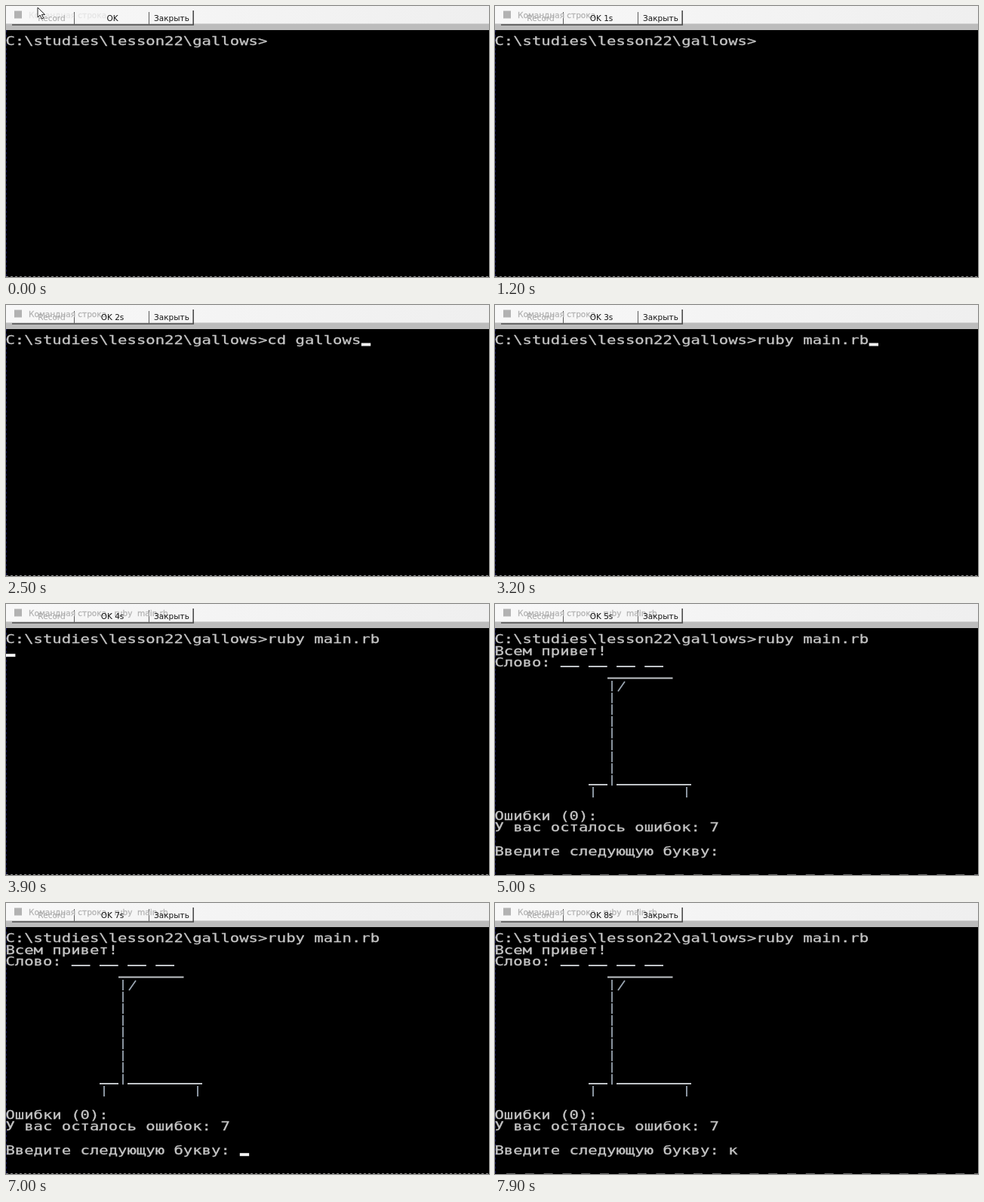
An HTML page that plays this animation: 640x360 px, repeating every 8 s.

```html
<!DOCTYPE html>
<html lang="ru">
<head>
<meta charset="utf-8">
<title>Console game</title>
<style>
  html, body { margin: 0; width: 100%; height: 100%; overflow: hidden; background: #000; }
  svg { display: block; width: 640px; height: 360px; }
  text { white-space: pre; }
  .ui { font: 10.5px "DejaVu Sans", sans-serif; fill: #151515; }
  .mid { text-anchor: middle; }
  #caption { fill: #b4b4b4; stroke: #b4b4b4; stroke-width: .3; }
  #console { font: 15.5px "DejaVu Sans Mono", monospace; fill: #c4c4c4; stroke: #c4c4c4; stroke-width: .3; }
  .art { fill: none; stroke: #c0c4c8; stroke-width: 2; }
  .thin { stroke: #98a4b0; stroke-width: 1.8; }
</style>
</head>
<body>
<svg viewBox="0 0 640 360">
  <defs>
    <linearGradient id="bar">
      <stop offset="0" stop-color="#f8f8f8"/>
      <stop offset="1" stop-color="#efefef"/>
    </linearGradient>
  </defs>

  <rect width="640" height="360"/>
  <path d="M.5 32V360" stroke="#10104c" stroke-dasharray="3 3"/>
  <path id="edge" d="M15 359.5H640"/>

  <rect width="640" height="24" fill="url(#bar)"/>
  <rect y="23.5" width="640" height="8.5" fill="#bcbcbc"/>
  <rect x="11" y="6.5" width="10" height="10" fill="#b2b2b2"/>
  <path d="M90.5 8V24M189.5 8V24" stroke="#5c5c5c"/>
  <path d="M8 25H248.2V6" fill="none" stroke="#4c4c4c" stroke-width="1.6"/>
  <text id="caption" class="ui" x="30" y="15.5"></text>
  <text class="ui mid" x="60.5" y="19.5" style="fill:#a6a6a6">Record</text>
  <text id="counter" class="ui mid" x="141" y="19.5"></text>
  <text class="ui mid" x="219.5" y="19.5">Закрыть</text>
  <path id="pointer" d="M42 2V15l3-3 2.6 5 2.2-1-2.5-4.6h4.2z" fill="#fff" stroke="#222"/>

  <g id="console"></g>
  <g id="gallows">
    <path id="blanks" class="art"/>
    <path class="art" d="M149 98.5H235.5M124 240H149M161 240H260"/>
    <path class="art thin" d="M155 102V242" stroke-dasharray="14 1.65"/>
    <path class="art thin" d="M130 243V257M254 243V257M163 116L172 103"/>
  </g>
  <rect id="caret" width="12.4" height="4" fill="#f4f4f4"/>
</svg>
<script>
const LOOP = 8000, BLINK = 940;
const CELL = 12.39, LINE = 15.65, LEFT = -0.6, BASE = 52;
// the console is shown at 4:3 widened to 16:9
const WIDEN = 1.328;

const $ = id => document.getElementById(id);
const prompt = "C:\\studies\\lesson22\\gallows>";
const run = prompt + "ruby main.rb";
const ask = "Введите следующую букву: ";
const game = {
  0: run, 1: "Всем привет!", 2: "Слово:", 15: "Ошибки (0):",
  16: "У вас осталось ошибок: 7"
};

// blink: a moment at which the caret lights up
const scenes = [
  { at: 0, blink: 400, rows: { 0: prompt } },
  { at: 2200, blink: 2200, rows: { 0: prompt + "cd gallows" } },
  { at: 2900, blink: 2900, rows: { 0: run } },
  { at: 3700, blink: 3700, rows: { 0: run, 1: "" } },
  { at: 4500, blink: 5020, rows: { ...game, 18: ask }, game: true },
  { at: 7400, blink: 7400, rows: { ...game, 18: ask + "к" }, game: true }
];
const ticks = [900, 1800, 2700, 3700, 4600, 5500, 6400, 7200];

$("blanks").setAttribute("d",
  [0, 1, 2, 3].map(i => `M${(7 + 3 * i) * CELL} 83h${2 * CELL}`).join(""));

const show = (el, on) => { el.style.visibility = on ? "visible" : "hidden"; };
let current;

function setScene(scene) {
  current = scene;
  const rows = Object.entries(scene.rows);
  $("console").replaceChildren(...rows.map(([row, line]) => {
    const el = document.createElementNS("http://www.w3.org/2000/svg", "text");
    el.setAttribute("transform", `translate(${LEFT} ${BASE + row * LINE}) scale(${WIDEN} 1)`);
    el.textContent = line;
    return el;
  }));
  const [row, line] = rows[rows.length - 1];
  $("caret").setAttribute("x", line.length * CELL);
  $("caret").setAttribute("y", BASE - 1.5 + row * LINE);
  show($("gallows"), scene.game);
}

// the selection border along the bottom alternates between two dash patterns
function drawEdge(sparse) {
  $("edge").setAttribute("stroke", sparse ? "#6c6c6c" : "#8c8c8c");
  $("edge").setAttribute("d", `M${sparse ? 15 : 0} 359.5H640`);
  $("edge").setAttribute("stroke-dasharray", sparse ? "12 12.8" : "3 3");
}

function draw() {
  const t = performance.now() % LOOP;
  const scene = scenes.findLast(s => t >= s.at);
  if (scene !== current) setScene(scene);

  const phase = ((t - scene.blink) % BLINK + BLINK) % BLINK;
  const lit = phase < BLINK / 2;
  show($("caret"), lit);
  drawEdge(scene.game && !lit);
  show($("pointer"), t < 400);

  const seconds = ticks.filter(at => t >= at).length;
  $("counter").textContent = seconds ? `OK ${seconds}s` : "OK";
  $("caption").textContent = "Командная строка" + (t < 3700 ? "" : " - ruby  main.rb");
  $("caption").style.opacity = t < 1000 ? 0.25 : 1;
  requestAnimationFrame(draw);
}
draw();
</script>
</body>
</html>
```
